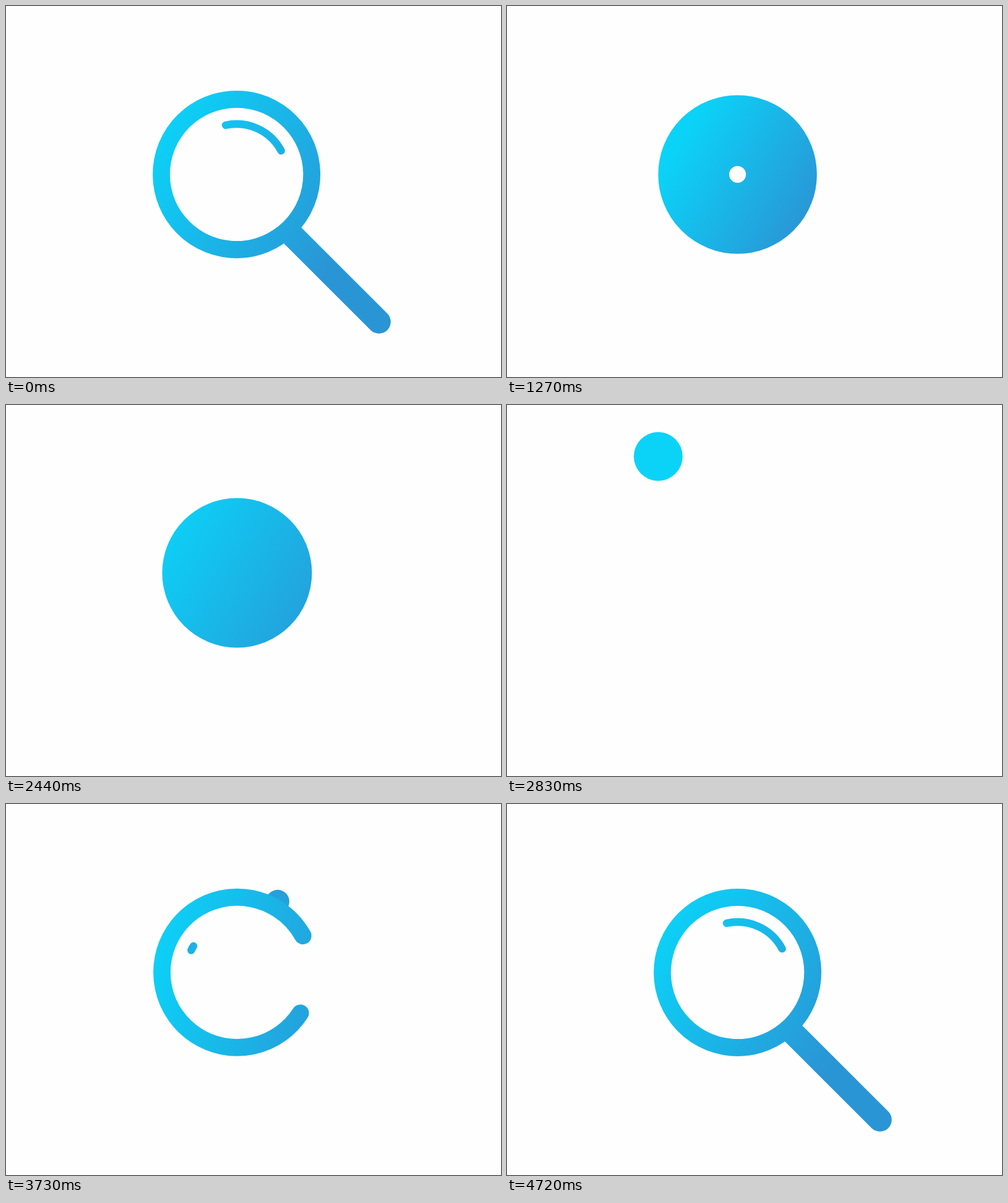
Recreate the animation shown at these times as an HTML page with a canvas. Size 800 by 600 pixels, loop 4.75 s.

```html
<!DOCTYPE html>
<html lang="en">
<head>
<meta charset="utf-8">
<title>Search icon loop</title>
<style>
  html, body { margin: 0; width: 100%; height: 100%; overflow: hidden; background: #fefefe; }
  canvas { display: block; width: 800px; height: 600px; }
</style>
</head>
<body>
<canvas id="stage" width="800" height="600"></canvas>
<script>
const ctx = document.getElementById('stage').getContext('2d');
const LOOP = 4750;
const CX = 372.6, CY = 272.4;
const RING = 121.6, RING_WIDTH = 27.8;
const GLARE = 81.6, GLARE_WIDTH = 12.4, GLARE_SPAN = 74.4, GLARE_END = -28;
const BALL = 122.6;

const rad = deg => deg * Math.PI / 180;
const mix = (a, b, u) => a + (b - a) * u;

const sine = u => (1 - Math.cos(Math.PI * u)) / 2;
const cubic = u => u < 0.5 ? 4 * u ** 3 : 1 - 4 * (1 - u) ** 3;
const accelerate = u => u * u;
const slowDown = power => u => 1 - (1 - u) ** power;

// Eased progress from 0 to 1 between two times.
const progress = (t, from, to, curve = sine) =>
  curve(Math.min(1, Math.max(0, (t - from) / (to - from))));

function tint(from = -152, to = 205) {
  const dx = Math.cos(rad(31)), dy = Math.sin(rad(31));
  const g = ctx.createLinearGradient(CX + dx * from, CY + dy * from, CX + dx * to, CY + dy * to);
  g.addColorStop(0, '#0bd3f8');
  g.addColorStop(1, '#2a95d5');
  return g;
}

function rotated(turn, paint, pivotY = CY) {
  ctx.save();
  ctx.translate(CX, pivotY);
  ctx.rotate(rad(turn));
  ctx.translate(-CX, -pivotY);
  paint();
  ctx.restore();
}

function disc(x, y, r, fill = tint()) {
  ctx.fillStyle = fill;
  ctx.beginPath();
  ctx.arc(x, y, r, 0, 2 * Math.PI);
  ctx.fill();
}

function arc(radius, width, start, end, paint = tint()) {
  ctx.strokeStyle = paint;
  ctx.lineWidth = width;
  ctx.lineCap = 'round';
  ctx.beginPath();
  ctx.arc(CX, CY, radius, rad(start), rad(end));
  ctx.stroke();
}

function handle(length) {
  if (length <= 0) return;
  ctx.strokeStyle = tint();
  ctx.lineCap = 'round';
  ctx.lineWidth = mix(28, 38, Math.min(1, length * 50));
  ctx.beginPath();
  ctx.moveTo(459, 367);
  ctx.lineTo(459 + 143.8 * length, 367 + 143.8 * length);
  ctx.stroke();
}

function glare(shown) {
  if (shown > 0) arc(GLARE, GLARE_WIDTH, GLARE_END - GLARE_SPAN * shown, GLARE_END);
}

// The handle slides in and the lens fills up into a ball with a springy wobble.
function drawCollapse(t) {
  handle(1 - progress(t, 970, 1270));
  glare(1 - progress(t, 970, 1240));

  const age = t - 1000;
  const wobble = 22 * Math.exp(-age / 246) * Math.sin(Math.PI * age / 270);
  const outer = mix(135.5, BALL, progress(t, 1000, 1500)) + (t < 1810 ? wobble : 0);
  const inner = mix(107.7, 0, progress(t, 970, 1360));
  const focus = progress(t, 1000, 1400);
  const paint = tint(mix(-152, -95, focus), mix(205, 118, focus));
  if (inner > 0) arc((outer + inner) / 2, outer - inner, 0, 360, paint);
  else disc(373.2, 271.3, outer, paint);
}

// The ball shrinks while it leaps up to the left and drops onto the ring's path.
function drawLeap(t) {
  const x = mix(373.4, 225, progress(t, 2440, 2950))
    + 26 * progress(t, 2950, 3100, accelerate);
  const y = mix(271.5, 81.3, progress(t, 2440, 2800))
    + 191 * progress(t, 2800, 3100, accelerate);
  const r = mix(121, RING_WIDTH / 2, progress(t, 2440, 3080, cubic));
  disc(x, y, r);
}

// The dot runs along the ring, closes it, and the handle swings into place.
function drawLens(t) {
  const swing = -122 / (1 + Math.exp((t - 3870) / 70));
  rotated(swing, () => handle(progress(t, 3695, 4070)));

  const tail = mix(200, -13, progress(t, 3100, 3520));
  const head = mix(200, -377, progress(t, 3100, 3900, slowDown(1.4)));
  const turn = -35 * (1 - progress(t, 3100, 4300));
  rotated(turn, () => arc(RING, RING_WIDTH, head, tail), CY - 3.5);

  const shown = progress(t, 3710, 4250, slowDown(2));
  rotated(-130 * (1 - shown), () => glare(shown));
}

function draw(now) {
  const t = now % LOOP;
  ctx.fillStyle = '#fefefe';
  ctx.fillRect(0, 0, 800, 600);
  if (t < 1000) drawLens(LOOP);
  else if (t < 2440) drawCollapse(t);
  else if (t < 3100) drawLeap(t);
  else drawLens(t);
}

let begin;
function tick(now) {
  begin ??= now;
  draw(now - begin);
  requestAnimationFrame(tick);
}
draw(0);
requestAnimationFrame(tick);
</script>
</body>
</html>
```
